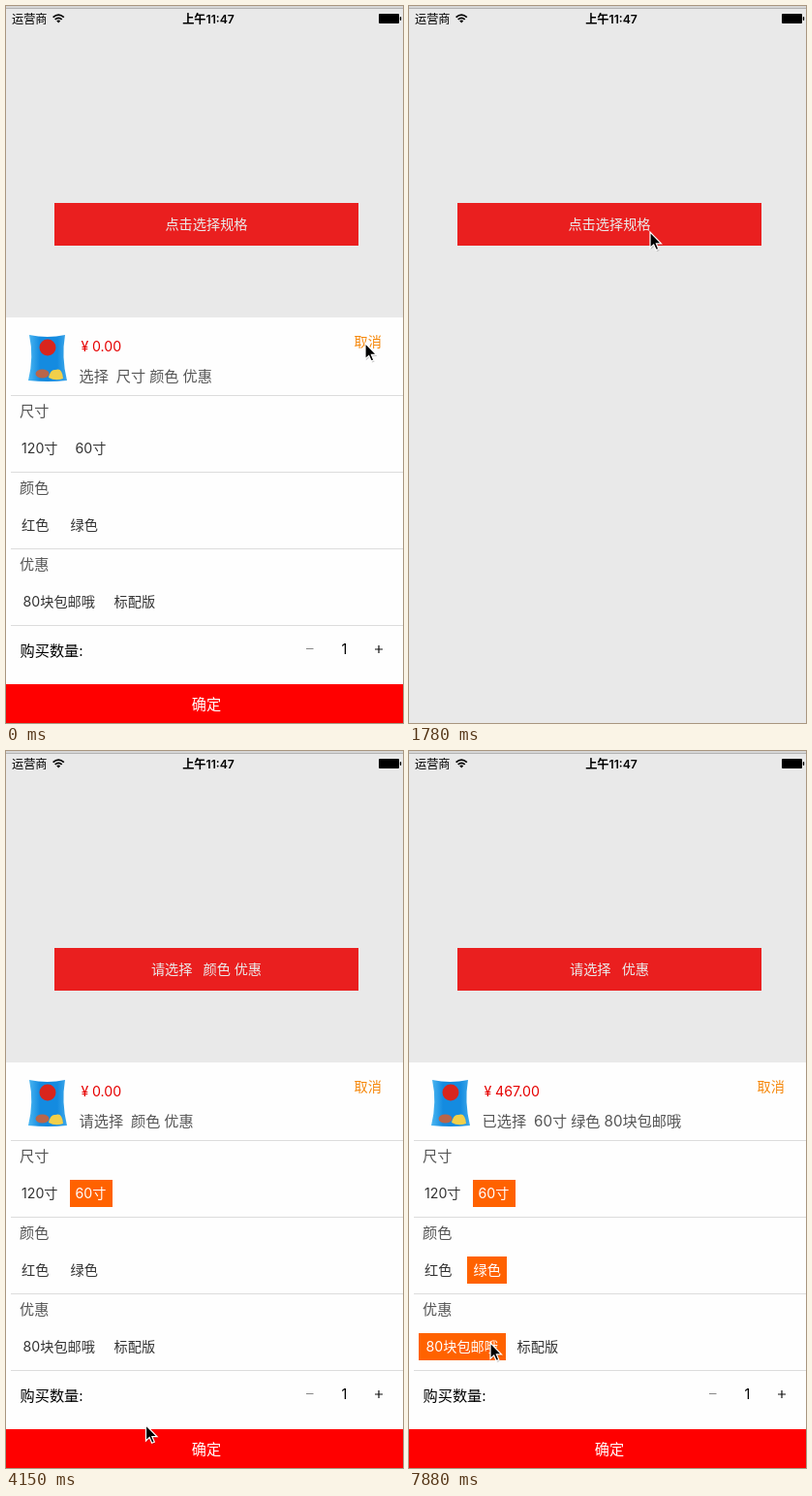
Write an HTML page that moves like this. It is 410 by 739 pixels and loops after 8 s.

```html
<!DOCTYPE html>
<html lang="zh-CN">
<head>
<meta charset="utf-8">
<title>选择规格</title>
<style>
html, body { margin: 0; width: 100%; height: 100%; overflow: hidden; background: #fff; }
svg { display: block; width: 100vw; height: 100vh; }
text { font-family: Inter, "Noto Sans CJK SC", "Noto Sans CJK", sans-serif; white-space: pre; word-spacing: -.02em; }
</style>
</head>
<body>
<svg viewBox="0 0 410 739">
  <defs>
    <linearGradient id="foil">
      <stop offset="0" stop-color="#4db8f2"/>
      <stop offset=".3" stop-color="#148be0"/>
      <stop offset=".75" stop-color="#148be0"/>
      <stop offset="1" stop-color="#3fa9ea"/>
    </linearGradient>
    <path id="arrow" d="M0 0V16.3L3.7 12.9L6.2 18.6L8.8 17.5L6.4 11.9H11.5Z"/>
  </defs>
  <rect width="410" height="739" fill="#fefefe"/>
  <rect x="50" y="203" width="314" height="44" fill="#f00"/>
  <g id="button"></g>
  <rect id="dim" width="410" height="739" fill="#999" fill-opacity=".205"/>
  <g id="status">
    <rect width="410" height="2" fill="#d6d6d6"/>
    <rect y="2" width="410" height="1" fill="#b4b4b4"/>
    <path d="M48.6 11.6Q54.2 6.6 59.8 11.6M50.7 13.9Q54.2 10.8 57.7 13.9" fill="none" stroke="#000" stroke-width="1.8"/>
    <path d="M52.2 15.3Q54.2 13.7 56.2 15.3L54.2 17.4Z"/>
    <rect x="385" y="8" width="21" height="10" rx="1"/>
    <rect x="406.8" y="11" width="1.4" height="4" rx=".7"/>
  </g>
  <g id="sheet">
    <rect y="321" width="410" height="418" fill="#fefefe"/>
    <path d="M24 339Q43 343 61 339Q57 362 63 386Q43 388 23 386Q29 362 24 339Z" fill="url(#foil)"/>
    <circle cx="43" cy="352" r="8.5" fill="#d9251d"/>
    <ellipse cx="37.5" cy="379" rx="7" ry="4.5" fill="#b9654a"/>
    <path d="M44 383Q46 374 51 375Q58 372 59 384Q51 387 44 383Z" fill="#f2cf4a"/>
    <path d="M5 401.5H410M5 480.5H410M5 559.5H410M5 638.5H410" stroke="#dcdcdc"/>
    <path id="patches" d="M80 600h20v28h-20zM105 600h56v28h-56zM75 521h26v28h-26z" fill="#f0f0f0"/>
    <path d="M310 662.5H317.5" stroke="#888"/>
    <path d="M381 663H389M385 659V667" stroke="#111" stroke-width="1.2"/>
    <rect y="699" width="410" height="40" fill="#f00"/>
  </g>
  <g id="cursor">
    <use href="#arrow" x=".8" y="1.5" opacity=".22"/>
    <use href="#arrow" stroke="#fff" stroke-width="1.2"/>
  </g>
</svg>
<script>
const LOOP = 8000, TICK = 148.7;
const SMALL = 14.2, LARGE = 15.2, ROW = 79, SHEET_HEIGHT = 418;
const $ = id => document.getElementById(id);
const sheet = $("sheet");

function add(parent, tag, attrs) {
  const node = document.createElementNS("http://www.w3.org/2000/svg", tag);
  for (const key in attrs) node.setAttribute(key, attrs[key]);
  return parent.appendChild(node);
}

// y is the optical middle of the line
function label(parent, str, x, y, size, fill, extra) {
  const node = add(parent, "text", { x, y: y + size * .38, "font-size": size, fill, ...extra });
  node.textContent = str;
  return node;
}

const show = (node, on) => node.setAttribute("visibility", on ? "inherit" : "hidden");
const setText = (node, str) => { if (node.textContent !== str) node.textContent = str; };
const centred = { "text-anchor": "middle" };

label($("status"), "运营商", 6, 13.5, 12.2, "#000");
label($("status"), "上午11:47", 209, 13.5, 12.2, "#000", { ...centred, "font-weight": 600 });
const buttonText = label($("button"), "", 207, 225, SMALL, "#fff", centred);

label(sheet, "取消", 359.5, 346, SMALL, "#f5870a");
const price = label(sheet, "", 77.5, 351, SMALL, "#e60000");
const summary = label(sheet, "", 75.5, 381, LARGE, "#555");
label(sheet, "购买数量:", 14.5, 664, LARGE, "#000");
label(sheet, "1", 349.5, 662.5, SMALL, "#000", centred);
label(sheet, "确定", 207, 719, LARGE, "#fff", centred);

["尺寸", "颜色", "优惠"].forEach((str, row) => label(sheet, str, 14, 417.5 + ROW * row, LARGE, "#555"));

function chip(str, row, x, left, width, pickedAt = Infinity) {
  const back = add(sheet, "rect", { x: left, y: 442 + ROW * row, width, height: 28, fill: "#ff6200" });
  return { back, pickedAt, text: label(sheet, str, x, 456 + ROW * row, SMALL, "#333") };
}
const chips = [
  chip("120寸", 0, 16, 10, 50),
  chip("60寸", 0, 71.5, 66, 44, 2800),
  chip("红色", 1, 16, 10, 40),
  chip("绿色", 1, 66.5, 60, 41, 5600),
  chip("80块包邮哦", 2, 17.5, 10, 90, 7800),
  chip("标配版", 2, 111.5, 105, 56)
];

// Eased 0 to 1 between two times
function ramp(t, from, to) {
  const p = Math.min(1, Math.max(0, (t - from) / (to - from)));
  return p * p * (3 - 2 * p);
}

const cursorStart = { x: 371, y: 347.5 };
const moves = [
  { from: 200, to: 510, x: 264, y: 240 },
  { from: 1400, to: 1780, x: 249, y: 233 },
  { from: 1850, to: 2670, x: 84, y: 456.5 },
  { from: 3000, to: 3420, x: 148, y: 704 },
  { from: 4050, to: 4900, x: 76, y: 514 },
  { from: 4900, to: 5340, x: 77, y: 534.5 },
  { from: 5650, to: 6250, x: 176, y: 710 },
  { from: 6550, to: 6840, x: 132, y: 610 },
  { from: 7000, to: 7590, x: 84, y: 610 }
];

function cursorAt(t) {
  let { x, y } = cursorStart;
  for (const move of moves) {
    const p = ramp(t, move.from, move.to);
    x += (move.x - x) * p;
    y += (move.y - y) * p;
  }
  return `translate(${x} ${y})`;
}

// Latest [time, text] that has started
const textAt = (texts, t) => texts.findLast(([from]) => t >= from)[1];
const buttonTexts = [[0, "点击选择规格"], [3800, "请选择   颜色 优惠"], [6200, "请选择   优惠"]];
const summaries = [
  [0, "选择  尺寸 颜色 优惠"],
  [2800, "请选择  颜色 优惠"],
  [5600, "请选择  优惠"],
  [7800, "已选择  60寸 绿色 80块包邮哦"]
];

function draw(t) {
  const drop = SHEET_HEIGHT * (ramp(t, 290, 624) - ramp(t, 1785, 2120));
  sheet.setAttribute("transform", `translate(0 ${Math.floor(drop)})`);
  $("cursor").setAttribute("transform", cursorAt(t));
  show($("dim"), t < 700 || t > 1750);
  show($("patches"), t > 4700 && t < 6200);

  setText(buttonText, textAt(buttonTexts, t));
  setText(summary, textAt(summaries, t));
  setText(price, t < 7800 ? "¥ 0.00" : "¥ 467.00");

  for (const { back, text, pickedAt } of chips) {
    const picked = t >= pickedAt;
    show(back, picked);
    text.setAttribute("fill", picked ? "#fff" : "#333");
  }
}

const start = performance.now();
function play() {
  const t = (performance.now() - start) % LOOP;
  draw(Math.floor(t / TICK + .12) * TICK);
  requestAnimationFrame(play);
}
play();
</script>
</body>
</html>
```
